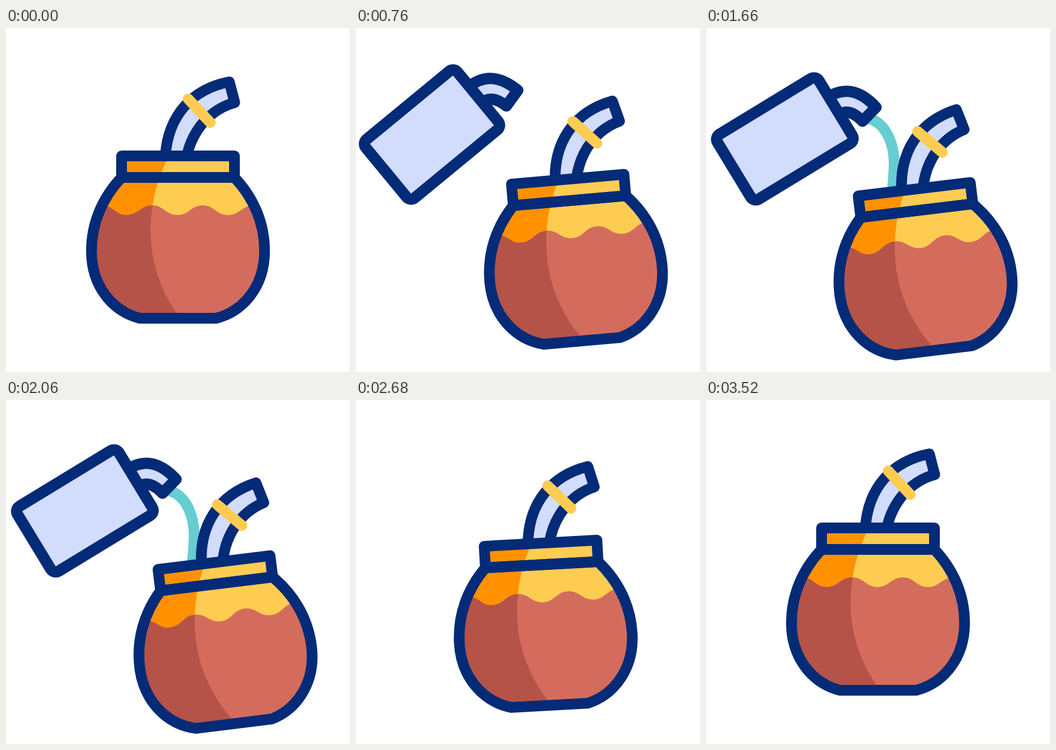
These frames come from a looping animation (640 px wide and 640 px high, 3600 ms). An HTML page:

```html
<!DOCTYPE html>
<html lang="en">
<head>
<meta charset="utf-8">
<title>Mate gourd</title>
<style>
  html, body { margin: 0; width: 100%; height: 100%; overflow: hidden; background: #fff; }
  svg { display: block; width: 100vw; height: 100vh; }
  .line { fill: none; stroke: #042b77; stroke-width: 20; }
  .steel { fill: #d2dcfd; stroke: #042b77; stroke-width: 20; stroke-linejoin: round; }
  #kettle .steel { stroke-width: 21; }
</style>
</head>
<body>
<svg viewBox="0 0 640 640">
  <defs>
    <path id="body" d="M215 278C180 315 159 362 159 415C159 480 198 527 249 540H391C442 527 481 480 481 415C481 362 460 315 425 278Z"/>
    <path id="drink" d="M130 330H178C201 330 202 348 224 348S250 330 272 330S297 348 319 348S344 330 366 330S391 348 413 348S439 330 461 330H520V560H130Z"/>
    <path id="shade" d="M140 230H306L299 246C280 285 269 330 269 378C269 440 292 495 318 531L325 560H140Z"/>
    <clipPath id="inside">
      <use href="#body"/>
      <rect x="215" y="238" width="210" height="41"/>
    </clipPath>
    <clipPath id="shadeClip"><use href="#shade"/></clipPath>
  </defs>

  <path id="stream" d="M296 167C338 173 351 222 350 256Q349 285 345 318" pathLength="1"
        fill="none" stroke="#66cdd1" stroke-width="20"/>

  <g id="pot">
    <path class="steel" d="M296.5 238C301.5 163 346 113.5 415.5 100.3L425.5 138.8C380 151 347 190 336.5 238"/>
    <path d="M339 132L380 176" stroke="#ffcc52" stroke-width="20" stroke-linecap="round"/>
    <g clip-path="url(#inside)">
      <rect x="140" y="230" width="360" height="320" fill="#ffcc52"/>
      <use href="#shade" fill="#ff9100"/>
      <use href="#drink" fill="#d46c5d"/>
      <use href="#drink" fill="#b55348" clip-path="url(#shadeClip)"/>
    </g>
    <use href="#body" class="line"/>
    <rect class="line" x="215" y="238" width="210" height="40" stroke-linejoin="round"/>
  </g>

  <g id="kettle">
    <path class="steel" d="M108 -25C148 -25 168 -2 176 38L141 47C137 28 128 13 108 13"/>
    <rect class="steel" x="-110" y="-70.5" width="221" height="141" rx="11"/>
  </g>
</svg>

<script>
const LOOP = 3600;
const $ = id => document.getElementById(id);
const pot = $('pot'), kettle = $('kettle'), stream = $('stream');

const out = u => 1 - (1 - u) ** 3;
const inOut = u => u < .5 ? 4 * u ** 3 : 1 - 4 * (1 - u) ** 3;
const linear = u => u;

// Each step: [start, end, easing, values reached]
const tracks = {
  shift: { from: [0], steps: [
    [260, 800, out, [81]],
    [1155, 1820, inOut, [77]],
    [2240, 3040, inOut, [0]]
  ] },
  // height and angle of the pot
  sway: { from: [0, 0], steps: [
    [260, 800, out, [43, -5]],
    [800, 1155, inOut, [20, -4.6]],
    [1155, 1820, inOut, [63.8, -7]],
    [2250, 3080, inOut, [0, 0]]
  ] },
  slide: { from: [-767, 64], steps: [
    [260, 800, out, [0, 0]],
    [2240, 3040, inOut, [-767, 0]]
  ] },
  tilt: { from: [-50.7], steps: [
    [334, 1144, inOut, [-31.3]],
    [2040, 2400, inOut, [-38]]
  ] },
  // tail and head of the visible part of the stream
  pour: { from: [0, 0], steps: [
    [1080, 1280, linear, [0, 1]],
    [2060, 2240, linear, [1, 1]]
  ] }
};

function at({ from, steps }, t) {
  let now = from;
  for (const [start, end, ease, to] of steps) {
    if (t <= start) break;
    const k = ease(Math.min(1, (t - start) / (end - start)));
    const base = now;
    now = to.map((v, i) => base[i] + (v - base[i]) * k);
  }
  return now;
}

function draw(t) {
  const [x] = at(tracks.shift, t);
  const [y, angle] = at(tracks.sway, t);
  pot.setAttribute('transform', `translate(${320 + x} ${320 + y}) rotate(${angle}) translate(-320 -320)`);

  const [dx, dy] = at(tracks.slide, t);
  const [tilt] = at(tracks.tilt, t);
  kettle.setAttribute('transform', `translate(${88 + dx} ${237 + dy}) rotate(${tilt}) translate(65.6 4.2)`);

  const [tail, head] = at(tracks.pour, t);
  stream.style.visibility = head - tail > .001 ? 'visible' : 'hidden';
  stream.setAttribute('stroke-dasharray', `${head - tail} 2`);
  stream.setAttribute('stroke-dashoffset', -tail);
}

const begin = performance.now();
function tick() {
  draw((performance.now() - begin) % LOOP);
  requestAnimationFrame(tick);
}
tick();
</script>
</body>
</html>
```
